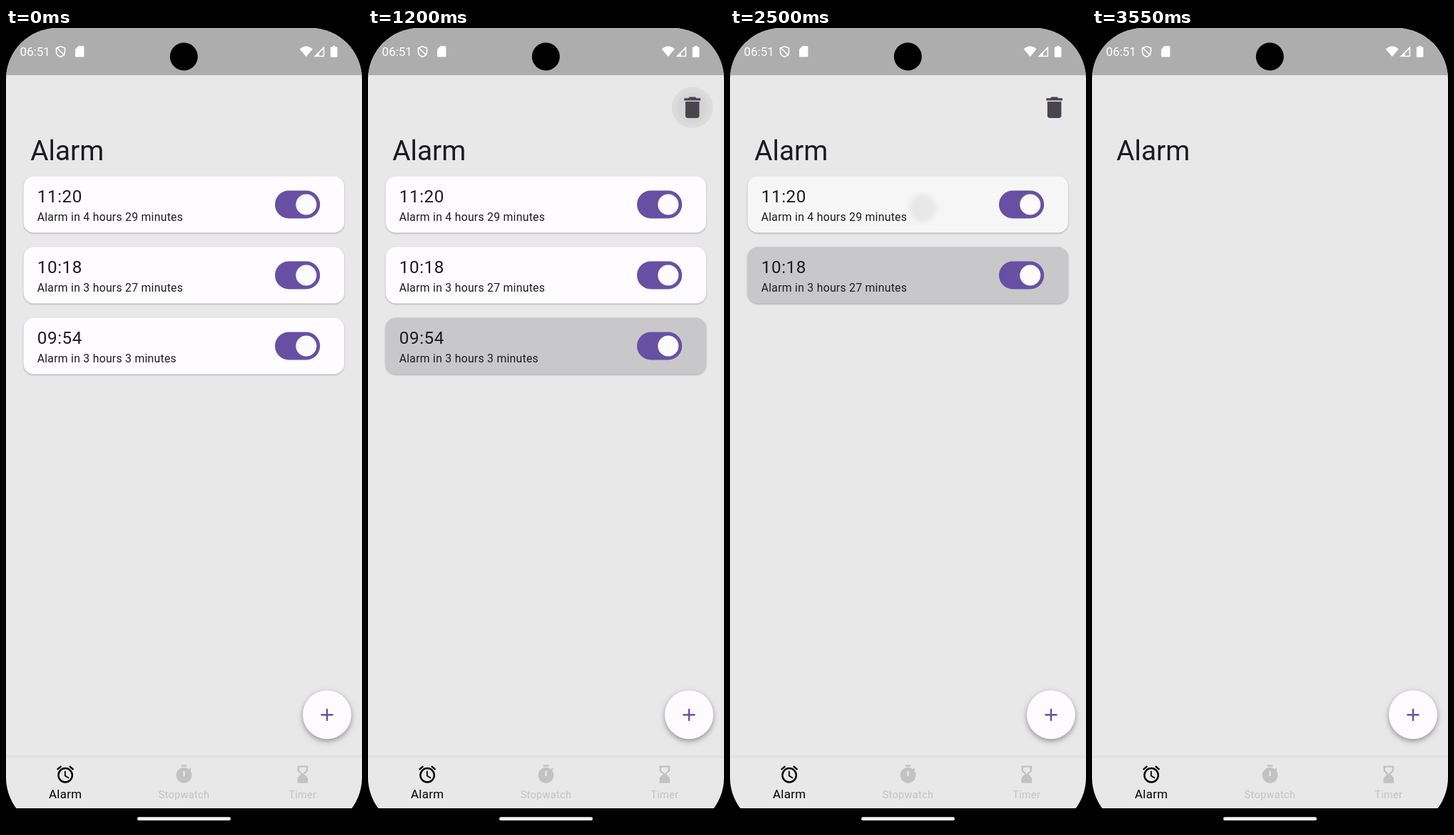
These frames come from a looping animation (499 by 1121 pixels, 4150 ms). An HTML page:

```html
<!DOCTYPE html>
<html lang="en">
<head>
<meta charset="utf-8">
<title>Alarm list</title>
<style>
  html, body { margin: 0; width: 100%; height: 100%; overflow: hidden; background: #000; }
  svg { display: block; width: 499px; height: 1121px; }
  text { font-family: Roboto, "Noto Sans", sans-serif; fill: #1c1b1f; }
  .time { font-size: 24.25px; letter-spacing: .6px; }
  .note { font-size: 15.76px; letter-spacing: .28px; }
  .tab { font-size: 14.55px; letter-spacing: .3px; text-anchor: middle; fill: #c2c2c3; }
  .tab.on { font-size: 16.97px; fill: #000; }
  .card { filter: drop-shadow(0 1px 1px rgba(0, 0, 0, .28)); }
  .fab { filter: drop-shadow(0 3px 3px rgba(0, 0, 0, .25)) drop-shadow(0 2px 5px rgba(0, 0, 0, .14)); }
</style>
</head>
<body>
<svg viewBox="0 0 499 1121">
  <defs>
    <clipPath id="screen"><rect width="499" height="1121" rx="72"/></clipPath>
    <clipPath id="cardClip"><rect x="24.6" width="449.4" height="78.8" rx="14.5"/></clipPath>
    <filter id="soft" x="-50%" y="-50%" width="200%" height="200%"><feGaussianBlur stdDeviation="3.5"/></filter>
    <linearGradient id="edge" x2="0" y2="1">
      <stop stop-opacity="0"/><stop offset="1" stop-opacity=".04"/>
    </linearGradient>
  </defs>
  <rect width="499" height="1121"/>
  <g clip-path="url(#screen)">
    <rect width="499" height="1092" fill="#e8e8e9"/>
    <rect width="499" height="66" fill="#adadad"/>
    <rect y="1017" width="499" height="4" fill="url(#edge)"/>
  </g>

  <!-- status bar -->
  <circle cx="249.3" cy="40" r="19.5"/>
  <text x="19.6" y="38.7" font-size="17" style="fill:#fff">06:51</text>
  <g fill="none" stroke="#fff" stroke-width="1.6">
    <path d="M76.5 25.8l6 2.3v5c0 3.4-2.5 6.2-6 7.3c-3.500-1.100-6-3.900-6-7.300v-5zM71 27.500L82 38.500"/>
  </g>
  <g fill="#fff">
    <path d="M101.500 25.300h6.700q1.200 0 1.200 1.200v12.700q0 1.200-1.200 1.200H98.200q-1.200 0-1.200-1.200V30z"/>
    <path d="M411.700 29.400Q420.700 21.600 429.800 29.400L420.700 40.300z"/>
    <path d="M446.200 25.500V40.300H431.500zM444.600 29.400L438.600 35.400V38.700H444.600z" fill-rule="evenodd"/>
    <path d="M438.600 35.400V39H432.800z"/>
    <path d="M457.700 25h3.800v1.500h1.600q1.300 0 1.300 1.300v11.900q0 1.300-1.300 1.300h-7q-1.300 0-1.300-1.300v-11.900q0-1.300 1.300-1.300h1.600z"/>
  </g>

  <text x="34.200" y="185" font-size="38.800">Alarm</text>
  <g id="cards"></g>

  <g id="trash">
    <circle id="halo" cx="454.700" cy="111.200" r="29"/>
    <circle id="tap" cx="454.700" cy="111.200" filter="url(#soft)"/>
    <path transform="translate(435.100 91.700) scale(1.630)" fill="#49454f"
      d="M6 19c0 1.100.9 2 2 2h8c1.100 0 2-.9 2-2V7H6v12zM19 4h-3.500l-1-1h-5l-1 1H5v2h14V4z"/>
  </g>

  <circle class="fab" cx="450" cy="961" r="34" fill="#fefbff"/>
  <path d="M441.500 961.200h17M450 952.700v17" stroke="#6750a4" stroke-width="2.400"/>

  <!-- bottom tabs -->
  <path transform="translate(68.600 1030) scale(1.2125)"
    d="M22 5.720l-4.600-3.860-1.290 1.530 4.600 3.860zM7.880 3.390L6.600 1.860 2 5.710l1.290 1.530zM12.500 8H11v6l4.750 2.850.75-1.230-4-2.370zM12 4a9 9 0 1 0 0 18a9 9 0 0 0 0-18zm0 16a7 7 0 1 1 0-14a7 7 0 0 1 0 14z"/>
  <g fill="#c2c2c3">
    <path transform="translate(235 1030) scale(1.2125)"
      d="M9 1h6v2H9zM19.030 7.390l1.420-1.420c-.43-.51-.9-.99-1.410-1.410l-1.420 1.420A9 9 0 1 0 19.030 7.390zM13 14h-2V8h2z"/>
    <path transform="translate(401.300 1030) scale(1.2125)"
      d="M18 22v-6l-4-4 4-4V2H6v6l4 4-4 4v6zM8 7.500V4h8v3.500l-4 4z"/>
  </g>
  <text class="tab on" x="83.200" y="1077.500">Alarm</text>
  <text class="tab" x="249.500" y="1078">Stopwatch</text>
  <text class="tab" x="415.800" y="1078">Timer</text>
  <rect x="184" y="1104.300" width="131" height="4.800" rx="2.400" fill="#f5f3f5"/>
</svg>
<script>
const LOOP = 4150, STEP = 50, HOLD = 250;
const alarms = [
  { time: "11:20", left: "4 hours 29 minutes", press: 2500, gone: 3550 },
  { time: "10:18", left: "3 hours 27 minutes", press: 1800, gone: 3550 },
  { time: "09:54", left: "3 hours 3 minutes", press: 300, gone: 1250 }
];
const $ = id => document.getElementById(id);
const set = (el, attrs) => { for (const k in attrs) el.setAttribute(k, attrs[k]); };
const show = (el, on) => set(el, { visibility: on ? "visible" : "hidden" });
const smooth = p => p * p * (3 - 2 * p);

$("cards").innerHTML = alarms.map((a, i) => `
  <g transform="translate(0 ${207.6 + 99 * i})">
    <rect class="card" x="24.6" width="449.4" height="78.8" rx="14.5"/>
    <g clip-path="url(#cardClip)"><circle class="ripple" cx="270" cy="44.5" filter="url(#soft)"/></g>
    <text class="time" x="43.7" y="36.5">${a.time}</text>
    <text class="note" x="43.7" y="62">Alarm in ${a.left}</text>
    <rect x="377" y="20" width="63.200" height="38.800" rx="19.400" fill="#6750a4"/>
    <circle cx="420.800" cy="39.400" r="14.500" fill="#fefbff"/>
  </g>`).join("");

alarms.forEach((a, i) => {
  a.el = $("cards").children[i];
  a.box = a.el.querySelector(".card");
  a.ripple = a.el.querySelector(".ripple");
});

function drawAlarm(a, t) {
  const held = t - a.press;
  const pressed = held >= 0 && held < HOLD;
  show(a.el, t < a.gone);
  set(a.box, { fill: held >= HOLD ? "#c8c8ca" : pressed ? "#f6f6f7" : "#fefcff" });
  set(a.ripple, {
    r: pressed ? 260 * smooth((held + STEP) / (HOLD + STEP)) : 0,
    "fill-opacity": .06
  });
}

function drawTrash(t) {
  const tapped = [1100, 3500].find(s => t >= s && t < s + 150);
  const p = tapped === undefined ? 0 : (t - tapped + STEP) / 150;
  show($("trash"), t >= 550 && t < 1250 || t >= 2050 && t < 3550);
  set($("halo"), { "fill-opacity": .045 * p });
  set($("tap"), { r: 23 * p, "fill-opacity": .045 });
}

function frame(now) {
  const t = Math.floor(now % LOOP / STEP) * STEP;
  alarms.forEach(a => drawAlarm(a, t));
  drawTrash(t);
  requestAnimationFrame(() => frame(performance.now()));
}
frame(performance.now());
</script>
</body>
</html>
```
